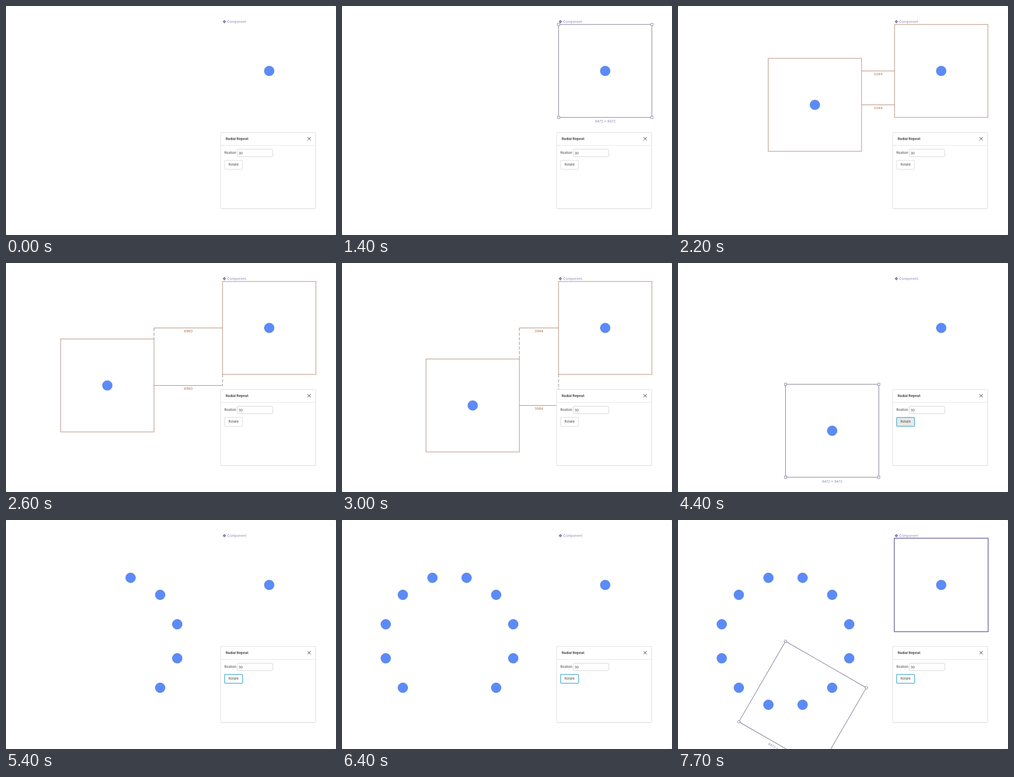
Animation, 640 px wide and 446 px high, one loop 8 s. Source, as an HTML page:

```html
<!DOCTYPE html>
<html>
<head>
<meta charset="utf-8">
<style>
  html, body { margin: 0; width: 100%; height: 100%; overflow: hidden; background: #aaa; }
  svg { display: block; width: 640px; height: 446px; font: 6.5px Inter, sans-serif; }
  .dot { fill: #5b8bfa; stroke: #587bc0; stroke-width: .7; }
  .size { fill: #8982b0; text-anchor: middle; }
  .select rect { fill: none; stroke: #77758f; }
  .select .handle { fill: #fff; stroke-width: .8; }
  .hover { fill: none; stroke: #7268a4; stroke-width: 1.6; }
  .guide { fill: none; stroke: #b08672; }
  .dash { fill: none; stroke: #858080; stroke-dasharray: 6 3; }
  .gap { fill: #ad7050; text-anchor: middle; font-size: 6.8px; }
  .snap { fill: none; stroke: #dc6558; stroke-width: .8; }
</style>
</head>
<body>
<svg viewBox="0 0 640 446">
  <rect width="640" height="446" rx="2" fill="#fff"/>
  <path fill="#6a5c9c" d="M423.5 27.3l1.5 1.5-1.5 1.5-1.5-1.5zm0 3.4l1.5 1.5-1.5 1.5-1.5-1.5zm-1.7-1.7l1.5 1.5-1.5 1.5-1.5-1.5zm3.4 0l1.5 1.5-1.5 1.5-1.5-1.5z"/>
  <text x="429" y="33" font-size="6.7" fill="#9289b9">Component</text>
  <g id="scene"></g>
  <g>
    <rect x="416" y="247" width="185" height="148.5" rx="2.5" fill="#000" opacity=".07"/>
    <rect x="416.2" y="246.3" width="184.4" height="148" rx="2" fill="#fff" stroke="#d9d9d9" stroke-width=".9"/>
    <path d="M416.5 271.5h184" stroke="#e4e4e4" stroke-width=".9"/>
    <text x="426" y="261" font-size="6.7" font-weight="600" fill="#333">Radial Repeat</text>
    <path d="M584.8 255.3l6.2 6.4m0-6.4l-6.2 6.4" stroke="#333" stroke-width="1"/>
    <text x="423.5" y="288.2" fill="#444">Roation</text>
    <rect x="448.4" y="279" width="69" height="14.3" rx="1.5" fill="#fff" stroke="#d0d0d0" stroke-width=".9"/>
    <text x="451" y="288.6" fill="#444">30</text>
    <rect id="button" x="424" y="300.7" width="34.8" height="17.4" rx="1.5"/>
    <text x="441.4" y="311.3" text-anchor="middle" fill="#444">Rotate</text>
  </g>
</svg>
<script>
const scene = document.getElementById('scene');
const button = document.getElementById('button');
const LOOP = 8000, SIZE = 181, HALF = SIZE / 2, UNITS = 9472 / SIZE;
const home = [420, 36], end = [208.5, 236.2];

// Drag path: time, x, y
const path = [
  [2000, 385, 46], [2200, 175, 102], [2400, 42, 138], [2600, 106, 148],
  [2800, 123, 159.5], [3000, 163, 187], [3200, 203, 211], [3300, 213.7, 217],
  [3500, 212, 231], [3700, ...end]
];
const presses = [4400, 4800, 5000, 5300, 5500, 5900, 6100, 6300, 6900];
const copies = [4500, 4900, 5100, 5400, 5600, 5700, 6000, 6200, 6400, 6700, 7000];

const dot = ([x, y]) => `<circle class="dot" cx="${x + HALF}" cy="${y + HALF}" r="9.6"/>`;
const box = (cls, [x, y], grow = 0) =>
  `<rect class="${cls}" x="${x - grow}" y="${y - grow}" width="${SIZE + 2 * grow}" height="${SIZE + 2 * grow}"/>`;
const line = (cls, d) => `<path class="${cls}" d="${d}"/>`;
const turn = (angle, body) => `<g transform="rotate(${angle} ${end})">${body}</g>`;

function selection([x, y]) {
  let out = box('', [x, y]);
  for (const dx of [0, SIZE]) for (const dy of [0, SIZE])
    out += `<rect class="handle" x="${x + dx - 2.2}" y="${y + dy - 2.2}" width="4.4" height="4.4"/>`;
  return `<g class="select">${out}</g>
    <text class="size" x="${x + HALF}" y="${y + SIZE + 10.4}">9472 × 9472</text>`;
}

function dragged(t) {
  const i = Math.max(1, path.findIndex(p => p[0] >= t));
  const [t0, x0, y0] = path[i - 1], [t1, x1, y1] = path[i];
  const k = (t - t0) / (t1 - t0);
  return [x0 + (x1 - x0) * k, y0 + (y1 - y0) * k];
}

function measures([x, y]) {
  const right = x + SIZE, gap = home[0] - right, bottom = home[1] + SIZE;
  const top = home[1] + HALF, mid = y + HALF;
  let out = '';
  if (gap > 0 && y <= bottom) {
    const label = Math.round(gap * UNITS / 16) * 16;
    for (const at of [top, mid])
      out += line('guide', `M${right} ${at}H${home[0]}`) +
        `<text class="gap" x="${right + gap / 2}" y="${at + 8.5}">${label}</text>`;
    if (y > top) out += line('dash', `M${right} ${top}V${y}`);
    if (mid > bottom) out += line('dash', `M${home[0]} ${bottom}V${mid}`);
  }
  if (Math.abs(y - bottom) < .5) {
    out += line('snap', `M${x} ${bottom}H${home[0] + SIZE}`);
    for (const at of [x, right, home[0], home[0] + SIZE])
      out += line('snap', `M${at - 1.3} ${bottom - 1.3}l2.6 2.6m0-2.6l-2.6 2.6`);
  }
  return out;
}

function draw(ms) {
  const t = Math.floor(ms / 100) * 100;
  let out = dot(home);
  if ((t >= 900 && t < 1400) || t >= 7700) out += box('hover', home, .5);
  if (t >= 1400 && t < 2000) out += selection(home);
  if (t >= 2000 && t < 3800) {
    const at = dragged(t);
    out += dot(at) + box('guide', home) + box('guide', at) + measures(at);
  }
  if (t >= 3800) out += dot(end);
  if (t >= 3800 && t < 4500) out += selection(end);
  copies.forEach((start, i) => {
    if (t >= start) out += turn(-30 * (i + 1), dot(end));
  });
  if (t >= 7600) out += turn(30, selection(end));
  scene.innerHTML = out;

  const focused = t >= 4400;
  button.setAttribute('fill', presses.includes(t) ? '#e9e9e9' : '#fff');
  button.setAttribute('stroke', focused ? '#55b5d6' : '#d4d4d4');
  button.setAttribute('stroke-width', focused ? 1.5 : .9);
}

let origin;
function tick(now) {
  origin ??= now;
  draw((now - origin) % LOOP);
  requestAnimationFrame(tick);
}
draw(0);
requestAnimationFrame(tick);
</script>
</body>
</html>
```
